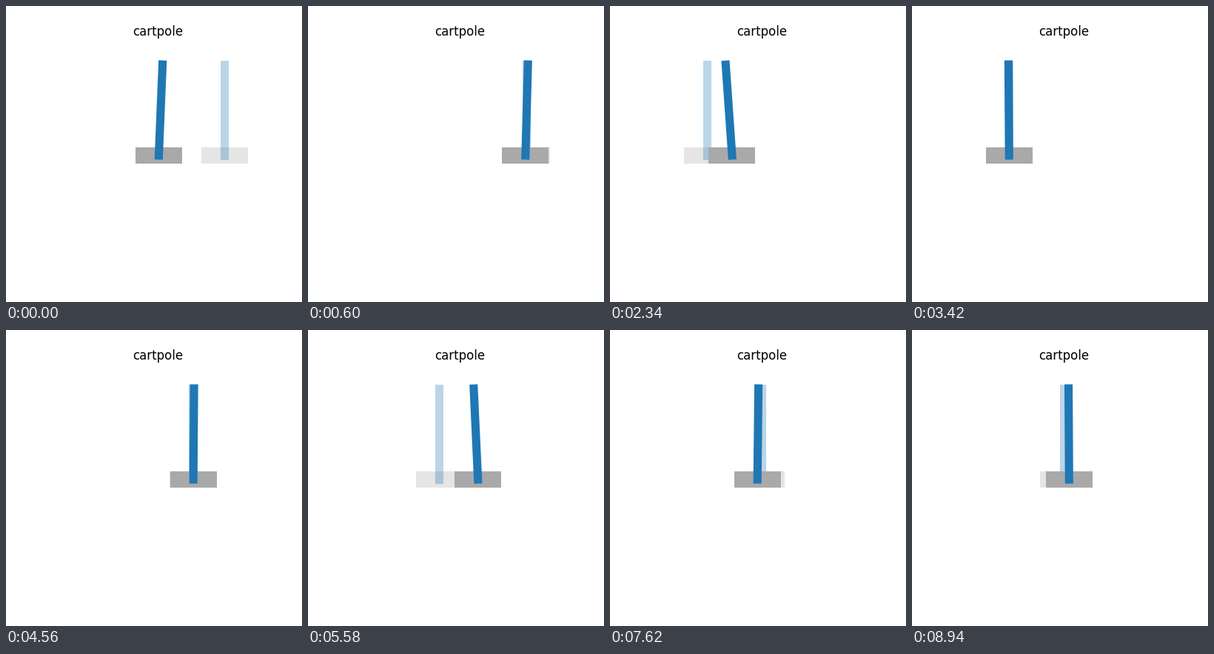
Write a matplotlib script that moves like this. It is 400 by 400 pixels and loops after 9000 ms.

```python
import numpy as np
import matplotlib.pyplot as plt
from matplotlib.animation import FuncAnimation
from matplotlib.patches import Rectangle

plt.rcParams["font.family"] = "DejaVu Sans"

FRAMES, STEP = 150, 60
PHASE = 30                      # frames per goal
AXLE, ROD = 202, 123            # pivot height and pole length in pixels
CART_W, CART_H = 63, 22
BIAS = -0.006                   # slight constant lean of the pole

GOALS = [295.2, 131.2, 252.2, 177.2, 204.8]
RESTS = [206.5, 307.3, 131.2, 253.2, 173.5, 212.3]   # where the cart settles


def ease(n):
    """Share of the way covered n frames after a new goal."""
    return np.sin(np.pi / 2 * min(n / 14.8, 1)) ** 1.05


def lean(n):
    """Pole angle per pixel of travel: tips ahead, then recovers."""
    return 0.000505 * np.exp(-((n - 3) / 10.5) ** 2)


def pose(i):
    phase, n = divmod(i, PHASE)
    start, end = RESTS[phase:phase + 2]
    travel = end - start
    return start + travel * ease(n), BIAS + travel * lean(n)


fig, ax = plt.subplots(figsize=(4, 4), dpi=100, facecolor="white")
fig.subplots_adjust(left=0.125, right=0.9, bottom=0.11, top=0.88)
ax.set(xlim=(50, 360), ylim=(356, 48))
ax.set_title("cartpole", fontsize=12)
ax.axis("off")


def make_cartpole(alpha, z):
    cart = Rectangle((0, AXLE - CART_H / 2), CART_W, CART_H, color="darkgray",
                     lw=0, alpha=alpha, zorder=z)
    ax.add_patch(cart)
    pole, = ax.plot([], [], color="tab:blue", lw=8, alpha=alpha, zorder=z + 1,
                    solid_capstyle="projecting")
    return cart, pole


def place(parts, x, angle=0.0):
    cart, pole = parts
    cart.set_x(x - CART_W / 2)
    pole.set_data([x, x + ROD * np.sin(angle)],
                  [AXLE, AXLE - ROD * np.cos(angle)])


ghost = make_cartpole(0.3, 2)
actor = make_cartpole(1, 4)


def update(i):
    place(ghost, GOALS[i // PHASE])
    place(actor, *pose(i))
    return ghost + actor


anim = FuncAnimation(fig, update, frames=FRAMES, interval=STEP,
                     init_func=lambda: update(0), repeat=True, repeat_delay=0)
plt.show()
```
